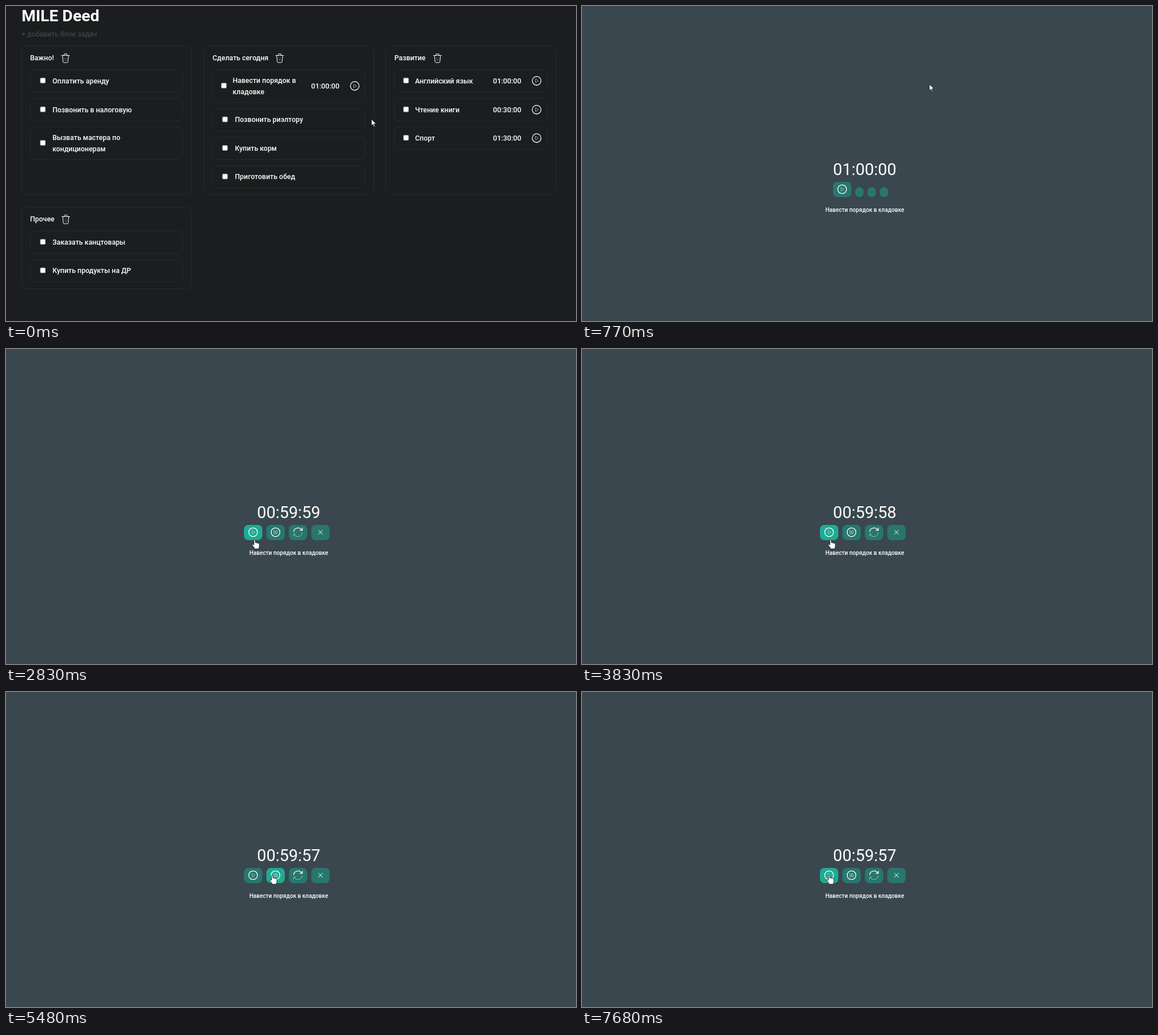
These frames come from a looping animation (1006 by 557 pixels, 8 s). An HTML page:

```html
<!DOCTYPE html>
<html lang="ru">
<head>
<meta charset="utf-8">
<title>Список задач</title>
<style>
  html, body { margin: 0; width: 100%; height: 100%; overflow: hidden; background: #1b1d1f; }
  svg { display: block; width: 1006px; height: 557px; }
  text { font: 500 12.4px Roboto, "Open Sans", sans-serif; fill: #fff; white-space: pre; }
  .title { font-size: 28.5px; font-weight: 700; }
  .add { font-weight: 400; fill: #4a4c50; }
  .time { font-size: 12.7px; }
  .clock { font-size: 29px; font-weight: 400; text-anchor: middle; }
  .caption { font-size: 10.1px; text-anchor: middle; }
  .box { fill: none; stroke: #27292b; }
  .check { fill: #fff; stroke: #8a8a8a; stroke-width: .8; }
  .line { fill: none; stroke: #fff; stroke-width: 1.3; stroke-linecap: round; stroke-linejoin: round; }
  .fine { stroke-width: 1; }
  .thin { fill: none; stroke: #b4cccb; stroke-width: .8; stroke-linejoin: round; }
  .btn { fill: #28776f; }
  .btn.on { fill: #1eab94; }
</style>
</head>
<body>
<svg viewBox="0 0 1006 557">
  <defs>
    <g id="trash">
      <path class="line fine" d="M-7-4.5H7M-3-4.7L-2.2-7.3H2.2L3-4.7M-5.3-4.5L-4.3 6.5Q-4.1 8-2.6 8H2.6Q4.1 8 4.3 6.5L5.3-4.5"/>
      <path class="thin" d="M-2.4.3H-1M1 .3H2.4M-1.6 3.7Q0 2.6 1.6 3.7"/>
    </g>
    <g id="play">
      <circle class="line" r="7.7"/>
      <path class="thin" d="M-2-2.7Q-2-3.3-1.4-3L2.7-.5Q3.2 0 2.7 .5L-1.4 3Q-2 3.3-2 2.7Z"/>
    </g>
    <g id="pause">
      <circle class="line" r="7.7"/>
      <path class="thin" d="M-3-2.8H-.8V2.8H-3ZM.8-2.8H3V2.8H.8Z"/>
    </g>
    <g id="reload">
      <path class="line" d="M-7.6-1A7.7 7.7 0 0 1 6.6-3.9M7.7-7.4V-3.4H3.7"/>
      <path class="thin" d="M7.6 1A7.7 7.7 0 0 1-6.6 3.9M-7.7 7.4V3.4H-3.7"/>
    </g>
    <g id="close"><path class="line fine" d="M-3.5-3.5L3.5 3.5M3.5-3.5L-3.5 3.5"/></g>
  </defs>
  <g id="list"></g>
  <g id="timer">
    <rect width="1006" height="557" fill="#3a474e"/>
    <text id="clock" class="clock" x="499" y="299"></text>
    <g id="loading"></g>
    <g id="buttons"></g>
    <text class="caption" x="499" y="364">Навести порядок в кладовке</text>
  </g>
  <circle id="press" r="9" fill="#c9bd00" fill-opacity=".68"/>
  <g id="cursor" stroke="#15181a" stroke-width=".9" stroke-linejoin="round" fill="#fff">
    <path id="arrow" d="M0 0V11.6L2.6 9.2L4.5 13.4L6.3 12.6L4.5 8.5H8.2Z"/>
    <path id="hand" d="M-1.5 1.4C-1.5-.3 1-.3 1 1.4V5.6C1.3 4.7 3.4 4.8 3.5 6.2C4 5.3 5.9 5.6 6 6.9C6.5 6.2 8.2 6.6 8.2 8V11.6C8.2 13.4 7.1 14 7 16.4H-.2C-.5 14.2-3.8 11.4-4.4 9.6C-4.7 8-2.8 7.9-1.5 9.6Z"/>
  </g>
</svg>
<script>
const $ = id => document.getElementById(id);
const LOOP = 8000;

// Markup helpers
const box = (x, y, w, h, r = 8, cls = "box") =>
  `<rect class="${cls}" x="${x}" y="${y}" width="${w}" height="${h}" rx="${r}"/>`;
const label = (x, y, s, cls = "") => `<text class="${cls}" x="${x}" y="${y}">${s}</text>`;
const icon = (name, x, y) => `<use href="#${name}" x="${x}" y="${y}"/>`;

// Task rows: top, height, text lines, optional duration
const blocks = [
  { x: 27.5, y: 70.5, h: 263, name: "Важно!", bin: 105, check: 65, text: 82, rows: [
    [112.5, 40, ["Оплатить аренду"]],
    [163.5, 40, ["Позвонить в налоговую"]],
    [214, 57.5, ["Вызвать мастера по", "кондиционерам"]]] },
  { x: 349.5, y: 70.5, h: 263, name: "Сделать сегодня", bin: 483, check: 386.5, text: 404, rows: [
    [112.5, 58, ["Навести порядок в", "кладовке"], "01:00:00"],
    [181.5, 39.5, ["Позвонить риэлтору"]],
    [232, 39.5, ["Купить корм"]],
    [282.5, 39.5, ["Приготовить обед"]]] },
  { x: 670.5, y: 70.5, h: 263, name: "Развитие", bin: 761.5, check: 706, text: 722, rows: [
    [112.5, 40, ["Английский язык"], "01:00:00"],
    [163.5, 40, ["Чтение книги"], "00:30:00"],
    [214, 39.5, ["Спорт"], "01:30:00"]] },
  { x: 27.5, y: 355.5, h: 144, name: "Прочее", bin: 105.5, check: 65, text: 82, rows: [
    [398, 39.5, ["Заказать канцтовары"]],
    [448.5, 39.5, ["Купить продукты на ДР"]]] }
];

function drawRow(b, [y, h, lines, time]) {
  const mid = y + h / 2, shift = time && lines.length > 1 ? 1 : 0;
  let s = box(b.x + 15, y, 269.5, h);
  s += box(b.check - 4.5 - shift * 2, mid - 5.3, 9, 9, 1.5, "check");
  lines.forEach((line, i) => {
    const dy = (i - (lines.length - 1) / 2) * 19.6;
    s += label(b.text - shift * 4, mid + 4.2 + dy, line);
  });
  if (time) s += label(b.x + 189, mid + 4.2, time, "time") + icon("play", b.x + 266, mid - .2);
  return s;
}

$("list").innerHTML = label(27.5, 27, "MILE Deed", "title") +
  label(27.5, 54, "+ добавить блок задач", "add") +
  blocks.map(b => box(b.x, b.y, 300, b.h) + label(b.x + 15, b.y + 25.5, b.name) +
    icon("trash", b.bin, b.y + 21.5) + b.rows.map(r => drawRow(b, r)).join("")).join("");

const BTN = { y: 311, w: 32.4, h: 27, step: 39.6, x: 420 };
const btnX = i => BTN.x + i * BTN.step;
$("buttons").innerHTML = ["play", "pause", "reload", "close"].map((name, i) =>
  box(btnX(i), BTN.y, BTN.w, BTN.h, 8, "btn") + icon(name, btnX(i) + 16.1, 324)).join("");
$("loading").innerHTML = box(443, BTN.y, BTN.w, BTN.h, 8, "btn") + icon("play", 459.1, 324) +
  [482.4, 504, 525.6].map(x => box(x, 320.3, 14.6, 17.7, 7.3, "btn")).join("");
const btns = [...$("buttons").querySelectorAll(".btn")];

// Pointer moves: start, end, from, to
const moves = [
  [0, 240, [645, 200], [613, 138]],
  [1240, 1640, [613, 138], [439, 337]],
  [4750, 5130, [439, 337], [470, 323.5]],
  [6700, 7080, [470, 323.5], [436.5, 323.5]]
];
const presses = [[670, 770], [1730, 1830], [5380, 5480], [7610, 7680]];
const ticks = [2830, 3830, 4820];
const ease = p => p * p * (3 - 2 * p);

function pointer(t) {
  const [a, b, from, to] = moves.filter(m => t >= m[0]).pop();
  const p = ease(Math.min(1, Math.floor((t - a) / 30) * 30 / (b - a)));
  return from.map((v, i) => v + (to[i] - v) * p);
}

function clockText(t) {
  const left = 3600 - ticks.filter(k => t >= k).length;
  return [left / 3600, left / 60 % 60, left % 60]
    .map(n => String(Math.floor(n)).padStart(2, "0")).join(":");
}

const show = (id, on) => $(id).setAttribute("visibility", on ? "inherit" : "hidden");

function render(t) {
  const [x, y] = pointer(t);
  const timer = t >= 770, ready = t >= 800;
  $("list").style.display = timer ? "none" : "";
  $("timer").style.display = timer ? "" : "none";
  show("loading", !ready);
  show("buttons", ready);
  $("clock").textContent = clockText(t);

  let hover = !timer && Math.hypot(x - 615, y - 141.5) < 9;
  btns.forEach((b, i) => {
    const on = ready && x >= btnX(i) && x <= btnX(i) + BTN.w && y >= BTN.y && y <= BTN.y + BTN.h;
    b.classList.toggle("on", on);
    hover = hover || on;
  });
  show("hand", hover);
  show("arrow", !hover);
  $("cursor").setAttribute("transform", `translate(${x} ${y})`);
  $("press").setAttribute("transform", `translate(${x} ${y})`);
  show("press", presses.some(([a, b]) => t >= a && t < b));
}

const start = performance.now();
function loop() {
  render((performance.now() - start) % LOOP);
  requestAnimationFrame(loop);
}
loop();
</script>
</body>
</html>
```
